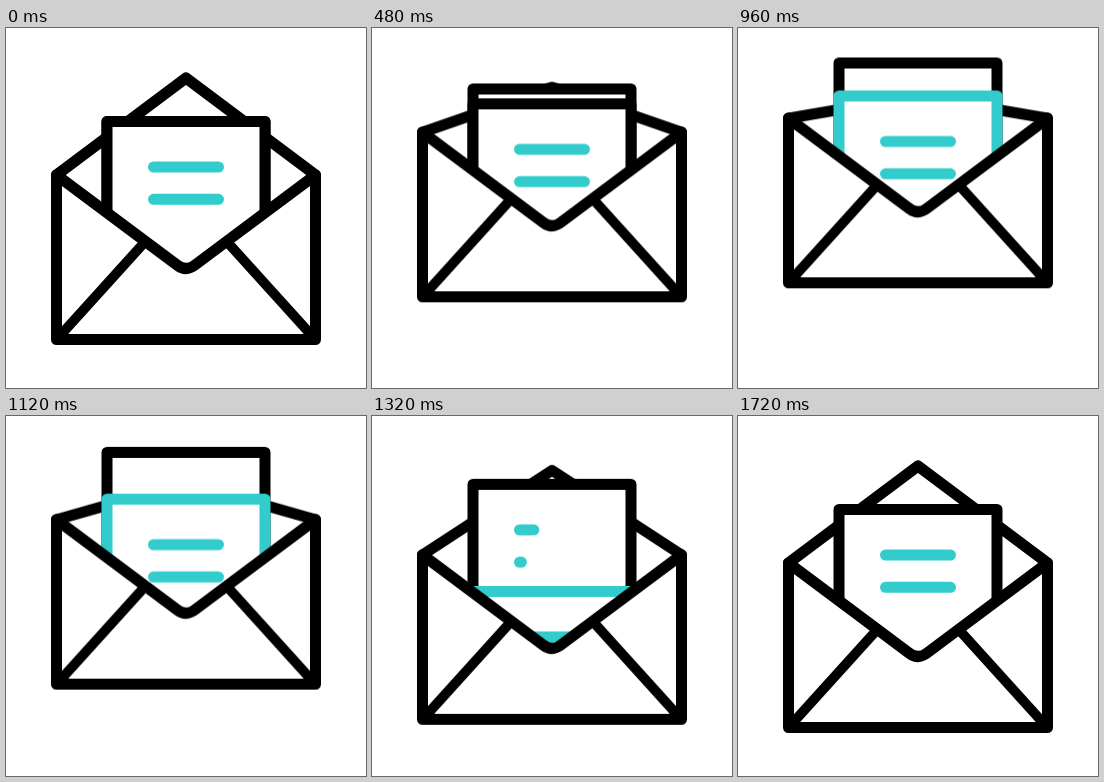
Write an HTML page that moves like this. It is 360 px wide and 360 px high and loops after 2 s.

```html
<!DOCTYPE html>
<html lang="en">
<head>
<meta charset="utf-8">
<title>Envelope</title>
<style>
html, body { margin: 0; width: 100%; height: 100%; overflow: hidden; background: #fff; }
svg { display: block; width: 100%; height: 100%; }

path { fill: none; stroke: #000; stroke-width: 11; stroke-linecap: round; stroke-linejoin: round; }
.teal { stroke: #3cc; }
.white { fill: #fff; stroke: none; }
.thin { stroke-width: 10; }

svg * { animation: 2s linear infinite; }
.env { animation-name: env; }
.flap { animation-name: flap; }
.back { animation-name: back; }
.front { animation-name: front; }
.ink { animation-name: ink; }
.trim, .line1, .line2 { stroke-dasharray: 1 2; }
.trim { animation-name: trim; }
.line1 { animation-name: line1; }
.line2 { animation-name: line2; }

@keyframes env {
  0%, 80%, 100% { transform: translateY(0); }
  8% { transform: translateY(0); animation-timing-function: cubic-bezier(.5, 0, .2, 1); }
  40% { transform: translateY(-57px); }
  46% { transform: translateY(-57px); animation-timing-function: cubic-bezier(.5, 0, .2, 1); }
}
@keyframes flap {
  0%, 81%, 100% { d: path("M50.5 147L180 50L309.5 147"); }
  10% { d: path("M50.5 147L180 50L309.5 147"); animation-timing-function: cubic-bezier(.5, 0, .2, 1); }
  40% { d: path("M50.5 147L180 125L309.5 147"); }
  46.5% { d: path("M50.5 147L180 125L309.5 147"); animation-timing-function: cubic-bezier(.5, 0, .2, 1); }
}
@keyframes back {
  0%, 86%, 100% { transform: translateY(0); }
  11% { transform: translateY(0); animation-timing-function: cubic-bezier(.5, 0, .2, 1); }
  43% { transform: translateY(-58.5px); }
  52% { transform: translateY(-58.5px); animation-timing-function: cubic-bezier(.5, 0, .2, 1); }
}
@keyframes front {
  0% { transform: translateY(0); }
  10% { transform: translateY(0); animation-timing-function: cubic-bezier(.5, 0, .2, 1); }
  40% { transform: translateY(-25.5px); }
  49% { transform: translateY(-25.5px); animation-timing-function: cubic-bezier(.5, 0, .5, 1); }
  81%, 100% { transform: translateY(164.5px); }
}
@keyframes ink {
  0%, 47% { opacity: 1; }
  47.01%, 100% { opacity: 0; }
}
@keyframes trim {
  0% { stroke-dashoffset: 1; }
  21.5% { stroke-dashoffset: 1; animation-timing-function: cubic-bezier(.33, 0, .67, 1); }
  46%, 100% { stroke-dashoffset: 0; }
}
@keyframes line1 {
  0%, 59.99% { stroke-dashoffset: 1; opacity: 0; }
  60% { stroke-dashoffset: 1; opacity: 1; animation-timing-function: cubic-bezier(.33, 0, .67, 1); }
  80%, 100% { stroke-dashoffset: 0; opacity: 1; }
}
@keyframes line2 {
  0%, 63.99% { stroke-dashoffset: 1; opacity: 0; }
  64% { stroke-dashoffset: 1; opacity: 1; animation-timing-function: cubic-bezier(.33, 0, .67, 1); }
  84%, 100% { stroke-dashoffset: 0; opacity: 1; }
}
</style>
</head>
<body>
<svg viewBox="0 0 360 360">
  <clipPath id="pocket"><rect width="360" height="250"/></clipPath>

  <g class="env"><path class="flap" d="M50.5 147L180 50L309.5 147"/></g>

  <g clip-path="url(#pocket)">
    <g class="back">
      <path class="white" d="M101 200V93.5H259V200z"/>
      <path d="M101 200V93.5H259V200"/>
      <path class="teal line1" pathLength="1" d="M147.5 139H212.5"/>
      <path class="teal line2" pathLength="1" d="M147.5 171.3H212.5"/>
    </g>
    <g class="front">
      <path class="white" d="M101 200V93.5H259V200z"/>
      <path class="ink" d="M101 200V93.5H259V200"/>
      <path class="teal trim" pathLength="1" d="M101 200V93.5H259V200"/>
      <path class="teal" d="M147.5 139H212.5M147.5 171.3H212.5"/>
    </g>
  </g>

  <g class="env">
    <path class="white" d="M50.5 147L171 237Q180 244 189 237L309.5 147V311.5H50.5z"/>
    <path class="thin" d="M51.5 310.5L137 216M308.5 310.5L223 216"/>
    <path d="M50.5 147L171 237Q180 244 189 237L309.5 147V311.5H50.5z"/>
  </g>
</svg>
</body>
</html>
```
